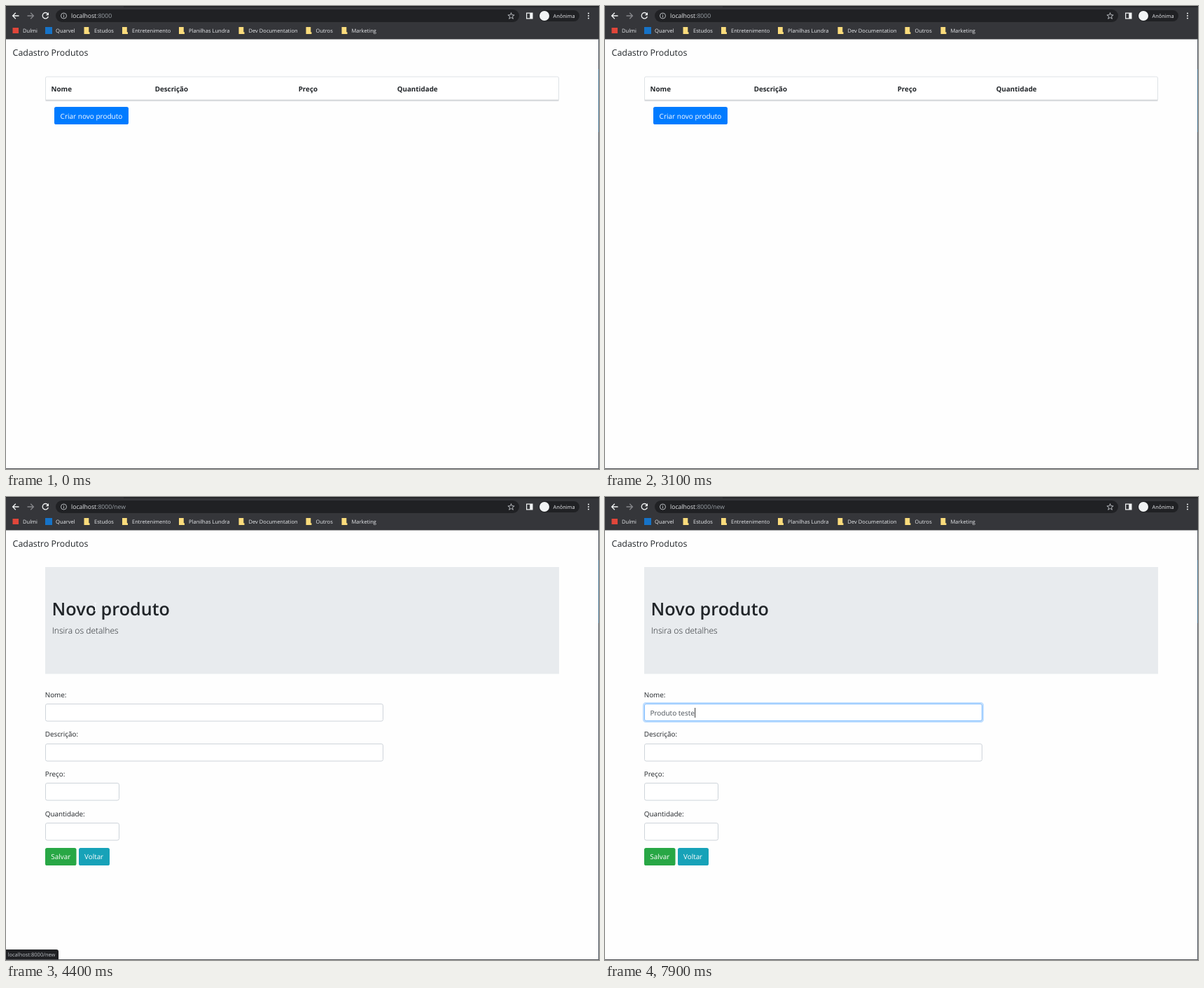
An HTML page that plays this animation: 847 by 661 pixels, repeating every 8 s.

```html
<!DOCTYPE html>
<html lang="pt-BR">
<head>
<meta charset="utf-8">
<title>Cadastro Produtos</title>
<style>
  html, body { margin: 0; width: 100%; height: 100%; overflow: hidden; background: #fefefe; }
  svg { display: block; width: 100vw; height: 100vh; }
  text { font-family: "Open Sans", "Noto Sans", sans-serif; font-size: 9.9px; fill: #212529;
         text-rendering: geometricPrecision; white-space: pre; }
  .bar text { font-size: 7.55px; fill: #e8eaed; }
  .bar .url { font-size: 8.65px; }
  .bar .dim { fill: #9aa0a6; }
  .head { font-weight: 700; font-size: 9.8px; }
  .white { fill: #fff; }
  .line { fill: none; stroke: #f1f3f4; stroke-width: 1.3; }
  .field { fill: #fff; stroke: #ced4da; }
  .pointer { fill: #fff; stroke: #111; stroke-width: .9; stroke-linejoin: round; }
</style>
</head>
<body>
<svg viewBox="0 0 847 661" preserveAspectRatio="none">
  <rect width="847" height="661" fill="#fefefe"/>

  <g class="bar">
    <rect width="847" height="47.5" fill="#35363a"/>
    <rect x="168" width="679" height="1.5" fill="#202124"/>
    <rect width="168" height="1" fill="#27282b"/>
    <rect x="71" y="5" width="662" height="18" rx="9" fill="#202124"/>
    <path class="line" d="M18.5 14H9.8M13.8 9.8L9.6 14l4.2 4.2"/>
    <path class="line" style="stroke:#85868a" d="M30.5 14h8.7M35.2 9.8l4.2 4.2l-4.2 4.2"/>
    <path class="line" d="M59.6 11A4.2 4.2 0 1 0 60.4 15"/>
    <path fill="#f1f3f4" d="M61 9v4.2h-4.2z"/>
    <g class="line" style="stroke:#c5c8cc;stroke-width:.9">
      <circle cx="82.5" cy="14" r="4"/>
      <path d="M82.5 13.3v3M82.5 11.5v1"/>
      <path id="star"/>
    </g>
    <path fill="#f1f3f4" fill-rule="evenodd" d="M743 9.5h9.5v9h-9.5zM744.2 10.7v6.6h4v-6.6z"/>
    <rect x="761" y="6" width="58" height="16" rx="8" fill="#202124"/>
    <circle cx="769" cy="14" r="7" fill="#f1f3f4"/>
    <text x="781.5" y="16.7" style="font-size:7.4px">Anônima</text>
    <g fill="#f1f3f4"><circle cx="832" cy="10.5" r="1"/><circle cx="832" cy="14" r="1"/><circle cx="832" cy="17.5" r="1"/></g>
    <text class="url" x="93" y="17">localhost<tspan id="path" class="dim"></tspan></text>
    <rect x="9.5" y="31" width="8.5" height="8" fill="#e0463a"/>
    <rect x="56" y="30" width="10" height="10" fill="#1673c8"/>
    <g id="marks"></g>
  </g>

  <text x="9.6" y="71.2" style="font-size:12.4px">Cadastro Produtos</text>

  <g id="list">
    <rect x="56.5" y="101" width="733" height="34" rx="2" fill="#fff" stroke="#dee2e6"/>
    <rect x="56.5" y="133.6" width="733" height="2.2" fill="#d6d9dc"/>
    <g id="heads"></g>
    <rect id="create" x="69" y="144" width="106" height="25" rx="2.6"/>
    <text class="white" x="77.6" y="160.6" style="font-size:10px">Criar novo produto</text>
  </g>

  <g id="form">
    <rect x="56" y="100" width="734" height="152.5" fill="#e8ebee"/>
    <text x="65.6" y="169" style="font-size:25.2px;font-weight:600">Novo produto</text>
    <text x="65.8" y="194.6" style="font-size:12.1px;font-weight:300">Insira os detalhes</text>
    <g id="fields"></g>
    <g id="focus">
      <rect x="55" y="294" width="485" height="27" rx="3.4" fill="none" stroke="#bfdeff" stroke-width="2.2"/>
      <rect x="56.5" y="295.5" width="482" height="24" rx="2.4" fill="#fff" stroke="#80bdff"/>
    </g>
    <text id="typed" x="64.4" y="311.8" style="font-size:10px;fill:#495057"></text>
    <rect id="caret" y="301" width="1" height="14" fill="#333"/>
    <rect x="56" y="501" width="44.5" height="25" rx="2.6" fill="#28a745"/>
    <text class="white" x="64.3" y="517.4">Salvar</text>
    <rect x="104" y="501" width="44" height="25" rx="2.6" fill="#17a2b8"/>
    <text class="white" x="112" y="517.4">Voltar</text>
    <g id="popup">
      <rect x="121" y="327.5" width="63.5" height="28.5" rx="3" fill="#000" opacity=".22"/>
      <path d="M129.5 326.5L135.2 320.5L141 326.5z" fill="#202124"/>
      <rect x="121" y="326" width="63.5" height="29" rx="3" fill="#202124"/>
      <text x="128.6" y="343.4" style="font-size:8.2px;fill:#e8eaed">DORVAN</text>
    </g>
  </g>

  <g id="status" class="bar">
    <path id="statusBox" d="M0 646H72Q75 646 75 649V661H0z"/>
    <text x="2.6" y="656.4" style="font-size:7.5px;fill:#bdc1c6">localhost:8000/new</text>
  </g>

  <rect y="660" width="847" height="1" fill="#505256"/>
  <rect x="846" y="47" width="1" height="614" fill="#596069"/>
  <rect x="846" y="90" width="1" height="90" fill="#4d7894"/>

  <g id="cursor">
    <path id="arrow" class="pointer" d="M0 0V14L3.2 11L5.4 16L7.6 15L5.5 10.2H10Z"/>
    <path id="hand" class="pointer" d="M-1 9V1.2A1.2 1.2 0 0 1 1.4 1.2V6.2Q2.6 5.4 3.6 6.8Q4.8 6 5.6 7.3Q7.2 6.8 7.2 9V11.5L6 15.5H0L-3.8 9.8Q-4.2 8 -2.6 8Z"/>
    <path id="beam" fill="none" stroke="#f8fbff" stroke-width=".9" d="M-2 -5.5H2M0 -5.5V5.5M-2 5.5H2"/>
  </g>
</svg>

<script>
const LOOP = 8000, STEP = 100;
const $ = id => document.getElementById(id);

function add(parent, tag, attrs, text) {
  const el = document.createElementNS("http://www.w3.org/2000/svg", tag);
  for (const key in attrs) el.setAttribute(key, attrs[key]);
  if (text) el.textContent = text;
  return $(parent).appendChild(el);
}

// Bookmark folders: icon x, label x, label
add("marks", "text", { x: 24, y: 37.7 }, "Dulmi");
add("marks", "text", { x: 71, y: 37.7 }, "Quarvel");
[[111, 126, "Estudos"], [165.5, 180, "Entretenimento"], [246.5, 261, "Planilhas Lundra"],
 [332, 346.5, "Dev Documentation"], [428, 442.5, "Outros"], [479, 493.5, "Marketing"]
].forEach(([icon, x, label]) => {
  add("marks", "path", { d: `M${icon + .5} 30h6.8v7.3h1.2v2.7h-8z`, fill: "#fbdc7c" });
  add("marks", "text", { x, y: 37.7 }, label);
});

[[64.5, "Nome"], [212.7, "Descrição"], [417.7, "Preço"], [558.7, "Quantidade"]]
  .forEach(([x, label]) => add("heads", "text", { x, y: 121.6, class: "head" }, label));

[["Nome:", 482], ["Descrição:", 482], ["Preço:", 105], ["Quantidade:", 105]].forEach(([label, width], i) => {
  const y = 295.2 + i * 56.8;
  add("fields", "text", { x: 55.7, y: y - 9.6 }, label);
  add("fields", "rect", { x: 56.5, y: Math.floor(y) + .5, width, height: 24.5, rx: 2.4, class: "field" });
});

const points = Array.from({ length: 10 }, (_, i) => {
  const r = i % 2 ? 2 : 4.8, a = i * Math.PI / 5;
  return `${721.5 + r * Math.sin(a)} ${14.4 - r * Math.cos(a)}`;
});
$("star").setAttribute("d", `M${points.join("L")}Z`);

// Each track lists [start time, ...values]; values hold until the next entry
const pointer = [
  [0], [300, "arrow", 12, 7], [400, "arrow", 62, 72], [500, "arrow", 112, 145], [600, "arrow", 127, 170],
  [800, "hand", 132.5, 165], [900, "hand", 133.5, 164],
  [1900, "hand", 133.5, 163.6], [2400, "arrow", 103, 102],
  [2600, "arrow", 58, 48], [2700, "arrow", 16, 4], [2800],
  [3400, "arrow", 20, 1], [3500, "arrow", 66, 72], [3600, "arrow", 110, 140], [3700, "arrow", 125, 166],
  [3900, "hand", 125, 160], [4000, "hand", 125, 157], [4300, "beam", 125.5, 158.5], [4400, "beam", 127.5, 157],
  [4700, "beam", 131, 185], [4800, "beam", 134, 240], [4900]
];
const hover = [[0, 0], [800, .4], [900, 1], [2600, .5], [2700, 0], [3900, .5], [4000, 1]];
const status = [[0, 0], [1100, .5], [1200, 1], [2900, .6], [3000, .25], [3100, 0],
  [4100, .5], [4200, 1], [4700, .6], [4800, .25], [4900, 0]];
const focus = [[0, 0], [5100, .45], [5200, .9], [5400, 1]];
const popup = [[0, 0], [5200, 1], [6100, .5], [6200, 0]];
const caret = [[0, 0], [5200, 1], [5700, 0], [6100, 1]];
const keys = [6100, 6300, 6600, 6800, 6900, 7000, 7200, 7400, 7500, 7600, 7700, 7800, 7900];
const phrase = "Produto teste";

const at = (track, t) => track.filter(k => k[0] <= t).pop().slice(1);
const show = (id, on) => $(id).style.display = on ? "" : "none";
const fade = (id, track, t) => $(id).setAttribute("opacity", at(track, t)[0]);

function draw(time) {
  const t = Math.floor(time / STEP) * STEP;
  const onForm = t >= 4400;
  show("list", !onForm);
  show("form", onForm);
  $("path").textContent = onForm ? ":8000/new" : ":8000";

  const h = at(hover, t)[0];
  $("create").setAttribute("fill", `rgb(0,${123 - 18 * h},${255 - 38 * h})`);
  fade("status", status, t);
  $("statusBox").setAttribute("fill", t < 3500 ? "#35383b" : "#202124");
  fade("focus", focus, t);
  fade("popup", popup, t);
  fade("caret", caret, t);

  $("typed").textContent = phrase.slice(0, keys.filter(k => k <= t).length);
  $("caret").setAttribute("x", 64.7 + (onForm ? $("typed").getComputedTextLength() : 0));

  const [shape, x = 0, y = 0] = at(pointer, t);
  ["arrow", "hand", "beam"].forEach(id => show(id, id === shape));
  $("cursor").setAttribute("transform", `translate(${x} ${y})`);
}

const start = performance.now();
function tick() {
  draw((performance.now() - start) % LOOP);
  requestAnimationFrame(tick);
}
tick();
</script>
</body>
</html>
```
